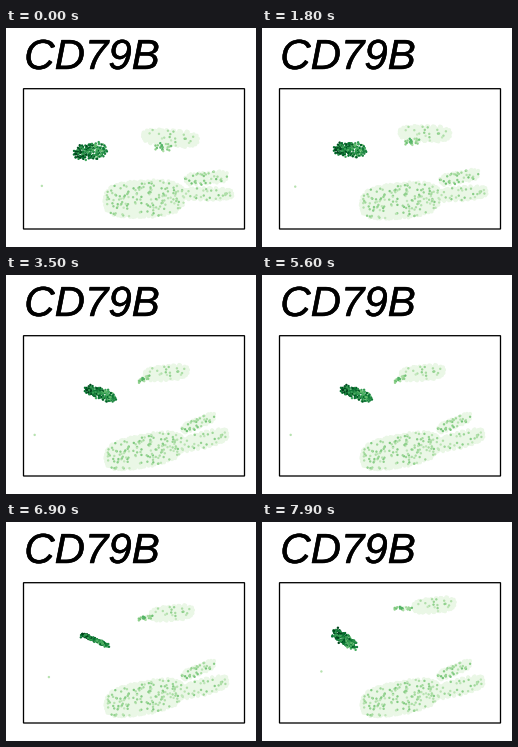
A matplotlib script that plays this animation: 250x219 px, repeating every 8000 ms.

```python
import numpy as np
import matplotlib.pyplot as plt
from matplotlib.animation import FuncAnimation
from matplotlib.patches import Rectangle
from matplotlib.patheffects import withStroke

W, H, DPI = 250, 219, 100
STEP, FRAMES = 100, 80
PX = 72 / DPI
BASE = 0.09
rng = np.random.default_rng(79)
layouts, values = [], []


def add(n, share, low, high, *keys, jitter=0.3, fade=0.0):
    """Fill a rounded patch with n cells, of which a share is above BASE.

    Each key is one layout: centre x, y, long half axis dx, dy, half height.
    A missing last layout repeats the one before.
    """
    i = np.arange(1, n + 1)
    r, ang = np.sqrt(i * 0.7548777 % 1), 2 * np.pi * (i * 0.5698403 % 1)
    c, s = np.cos(ang), np.sin(ang)
    r = r / (np.abs(c) ** 3 + np.abs(s) ** 3) ** (1 / 3)
    u, v = r * c, r * s
    wobble = rng.normal(0, jitter, (2, n))
    keys = (keys + keys[-1:] * 2)[:3]
    layouts.append([np.array([x + dx * u, y + dy * u + h * v]) + wobble
                    for x, y, dx, dy, h in keys])
    level = rng.uniform(low, high, n) - fade * u
    values.append(np.where(rng.random(n) < share, level, BASE))


# large group: body, lower arm, upper arm
add(900, 0.14, 0.27, 0.47, (138, 171, 40, -2, 18), (138, 176, 39, -7, 16))
add(260, 0.10, 0.27, 0.45, (201, 166, 26, 0, 6), (198, 165, 24, -6, 8))
add(130, 0.22, 0.30, 0.52, (200, 150, 22, -2, 6), (192, 148, 17, -7, 5))
# upper group and its tail
add(300, 0.09, 0.25, 0.45, (164, 110, 28, 2, 8), (160, 98, 22, -2, 7),
    (172, 83, 21, -2, 7))
add(26, 0.7, 0.32, 0.62, (157, 119, 9, 0, 4), (138, 104, 6, -3, 2),
    (141, 86, 10, 0, 1.5))
# dense group, turning over as its height changes sign
add(170, 1, 0.58, 1.0, (84, 123.5, 16, -2, 7.5), (94, 118.5, 15, 4.5, 5),
    (82, 117, 11.5, 7, -6), jitter=0.9, fade=0.13)
# lone cell
add(1, 1, 0.3, 0.31, (35.5, 158.5, 0, 0, 0), (28.3, 160.5, 0, 0, 0),
    (59.8, 149.8, 0, 0, 0))

layouts = np.concatenate(layouts, axis=2)
values = np.clip(np.concatenate(values), 0, 1)
order = np.argsort(values > BASE, kind="stable")
layouts, values = layouts[:, :, order], values[order]

fig = plt.figure(figsize=(W / DPI, H / DPI), dpi=DPI, facecolor="white")
ax = fig.add_axes([0, 0, 1, 1])
ax.set_xlim(0, W)
ax.set_ylim(H, 0)
ax.axis("off")

ax.text(18.3, 41, "CD79B", family="Liberation Sans", style="italic",
        size=42 * PX, color="black", va="baseline",
        path_effects=[withStroke(linewidth=0.5 * PX, foreground="black")])
ax.add_patch(Rectangle((17.5, 60.7), 221, 140.3, fill=False, ec="black",
                       lw=1.3 * PX, snap=False))
size = np.where(values > BASE, 2.4, 3.8) * PX
cells = ax.scatter(*layouts[0], s=size ** 2, c=plt.cm.Greens(values),
                   linewidths=0)


def ease(t):
    t = min(max(t, 0), 1)
    return 4 * t ** 3 if t < 0.5 else 1 - 4 * (1 - t) ** 3


def draw(i):
    k, ms = divmod(i * STEP, 5000)
    e = ease((ms - 450) / 3000)
    cells.set_offsets(((1 - e) * layouts[k] + e * layouts[k + 1]).T)
    return cells,


anim = FuncAnimation(fig, draw, frames=FRAMES, interval=STEP,
                     repeat=True, repeat_delay=0)
plt.show()
```
